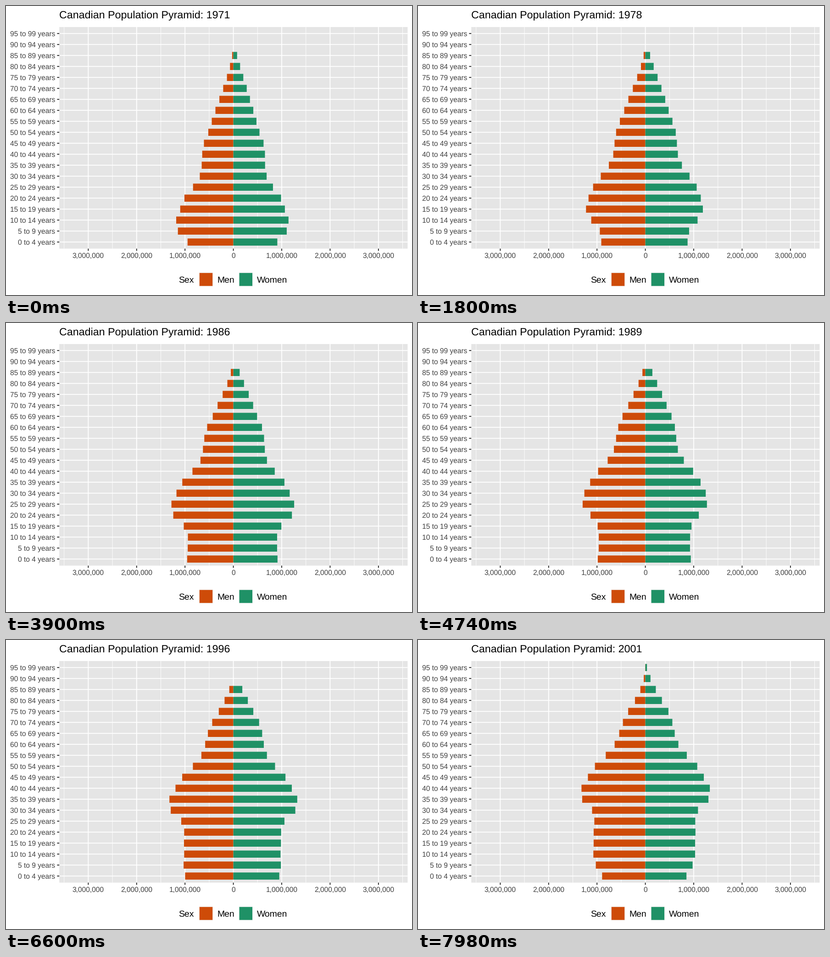
Recreate the animation shown at these times as a matplotlib script. Size 885 by 632 pixels, loop 8000 ms.

```python
import matplotlib.pyplot as plt
import numpy as np
from matplotlib.animation import FuncAnimation
from matplotlib.collections import PolyCollection
from matplotlib.patches import Rectangle

W, H, DPI = 885, 632, 100
LEFT, RIGHT, TOP, BOTTOM = 116.2, 875.4, 46, 530.6
ZERO, MILLION = 495.6, 105.42
ROW, FIRST_ROW, HALF = 24.0, 516.2, 7.8
PANEL, TEXT, TICK, KEY = "#E5E5E5", "#404040", "#272727", "#EFEFEF"
ORANGE, GREEN = "#CE4B08", "#1F9166"
PT = 72 / DPI

TICK_MS = 20
STEPS_PER_YEAR = 299 / 53
OLDEST_FROM = round(30 * STEPS_PER_YEAR)

# Full size of a five-year cohort in pixels, by birth year.
COHORTS = [(1883, 24), (1893, 31), (1903, 40.5), (1913, 52), (1918, 57.5),
           (1923, 66.5), (1928, 69.5), (1933, 70), (1938, 73.5), (1943.5, 92),
           (1948.5, 114.5), (1953.5, 128), (1958, 141), (1961, 143.5),
           (1964, 139.5), (1968.5, 119.5), (1973, 116.5), (1978.5, 124.5),
           (1983.5, 132.5), (1988.7, 144), (1993.8, 148), (1998.8, 137.5)]
BIRTH, SIZE = zip(*COHORTS)

# Share still to arrive at birth, age of full size; age of decline
# in 1980, its gain per year, and the spread of the decline.
MEN = dict(share=0.148, full=42, decline=80.6, gain=0.11, spread=10)
WOMEN = dict(share=0.182, full=45, decline=87.4, gain=0.08, spread=9.3)


def lengths(year, groups, share, full, decline, gain, spread):
    """Bar lengths: cohorts grow by immigration, then die off (Gompertz)."""
    age = 5 * np.arange(groups) + 2.5
    born = year - age
    share = share + 0.005 * np.maximum(born - 1965, 0)
    arriving = 0.5 + 0.5 * np.cos(np.pi * np.minimum(age / full, 1))
    hazard = np.exp((age - decline - gain * (year - 1980)) / spread)
    return np.interp(born, BIRTH, SIZE) * (1 - share * arriving) * np.exp(-hazard)


plt.rcParams["font.family"] = "Liberation Sans"
plt.rcParams["text.hinting"] = "none"

fig = plt.figure(figsize=(W / DPI, H / DPI), dpi=DPI, facecolor="white")
ax = fig.add_axes([0, 0, 1, 1])
ax.set_xlim(0, W)
ax.set_ylim(H, 0)
ax.axis("off")


def box(x0, y0, x1, y1, color):
    ax.add_patch(Rectangle((x0, y0), x1 - x0, y1 - y0, color=color, lw=0, snap=False))


def label(x, y, text, px, color="black", ha="left"):
    return ax.text(x, y, text, size=px * PT, color=color, ha=ha, va="baseline")


def vlines(xs, y0, y1, color, px):
    ax.vlines(xs, y0, y1, colors=color, linewidths=px * PT).set_snap(False)


def hlines(ys, x0, x1, color, px):
    ax.hlines(ys, x0, x1, colors=color, linewidths=px * PT).set_snap(False)


def bar_set(color):
    bars = PolyCollection([], facecolors=color, linewidths=0, snap=False, zorder=3)
    return ax.add_collection(bars, autolim=False)


rows = FIRST_ROW - ROW * np.arange(20)
millions = np.arange(-3, 4)
majors = ZERO + MILLION * millions
minors = ZERO + MILLION * np.arange(-3.5, 4)

# Panel, grid and axes
box(LEFT, TOP, RIGHT, BOTTOM, PANEL)
vlines(minors, TOP, BOTTOM, "white", 0.95)
hlines(rows, LEFT, RIGHT, "white", 1.88)
vlines(majors, TOP, BOTTOM, "white", 1.88)
hlines(rows, LEFT - 4.85, LEFT, TICK, 1.88)
vlines(majors, BOTTOM, BOTTOM + 4.85, TICK, 1.88)
for i, y in enumerate(rows):
    label(107, y + 5.6, f"{5 * i} to {5 * i + 4} years", 15.5, TEXT, "right")
for m, x in zip(millions, majors):
    label(x, 550.7, f"{abs(m) * 1000000:,}", 15.5, TEXT, "center")

# Legend
label(376.6, 604.8, "Sex", 19.4)
for x, color, name in ((436, ORANGE, "Men"), (522.8, GREEN, "Women")):
    for half, fill in ((15.2, KEY), (14.2, color)):
        box(x - half, 598 - half, x + half, 598 + half, fill)
    label(x + 24.2, 604.8, name, 19.4)

title = label(LEFT, 26.9, "", 23.2)
men, women = bar_set(ORANGE), bar_set(GREEN)


def bar_verts(sizes, side):
    return [[(ZERO, y - HALF), (ZERO + side * w, y - HALF),
             (ZERO + side * w, y + HALF), (ZERO, y + HALF)]
            for w, y in zip(sizes, rows)]


def update(i):
    # Three steps every 140 ms, the middle one held for 100 ms.
    step = 3 * (i // 7) + (i % 7 + 4) // 5
    year = 1971 + step / STEPS_PER_YEAR
    groups = 20 if step >= OLDEST_FROM else 18
    men.set_verts(bar_verts(lengths(year, groups, **MEN), -1))
    women.set_verts(bar_verts(lengths(year, groups, **WOMEN), 1))
    title.set_text(f"Canadian Population Pyramid: {round(year)}")
    return men, women, title


anim = FuncAnimation(fig, update, frames=8000 // TICK_MS, interval=TICK_MS,
                     init_func=lambda: update(0), repeat=True, repeat_delay=0)
plt.show()
```
